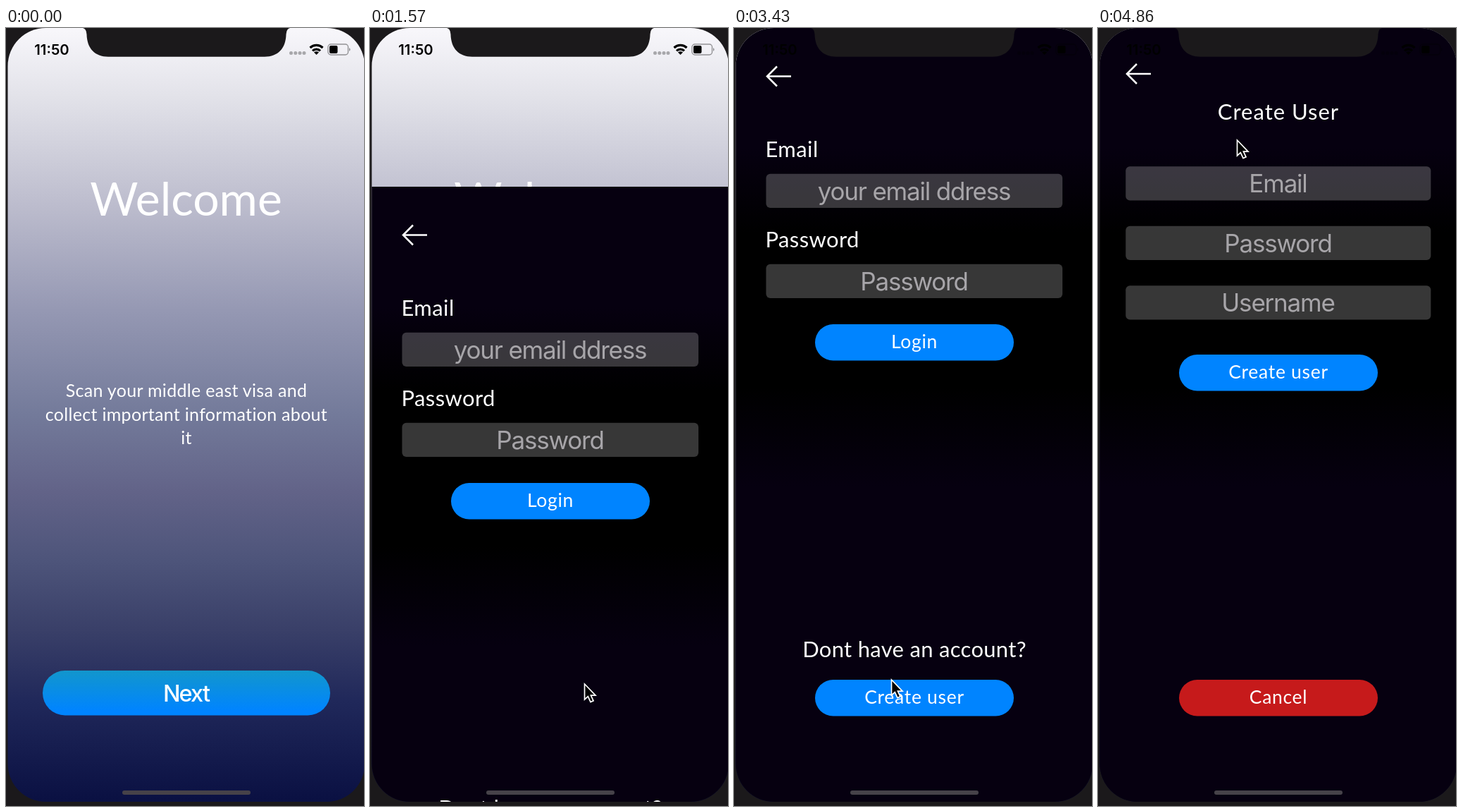
Animation of 508 by 1103 pixels, one loop 5.01 s. Source, as an HTML page:

```html
<!DOCTYPE html>
<html lang="en">
<head>
<meta charset="utf-8">
<title>Onboarding flow</title>
<style>
  html, body { margin: 0; width: 100%; height: 100%; overflow: hidden; background: #1b191b; }
  svg { display: block; width: 508px; height: 1103px; }
  text { text-anchor: middle; fill: #fff; font-family: Lato, sans-serif; font-optical-sizing: none; }
  .intro { font-size: 25px; letter-spacing: .3px; }
  .label { font-size: 31px; letter-spacing: .4px; text-anchor: start; }
  .question { font-size: 31px; letter-spacing: .3px; }
  .title { font-size: 31px; letter-spacing: 1px; }
  .button { font-size: 26.5px; letter-spacing: .7px; }
  .hint { font: 35px Inter, sans-serif; letter-spacing: -1.2px; fill: #a7a5a9; }
  .next { font: 500 32.5px Inter, sans-serif; letter-spacing: -1.9px; }
  .clock { font: 600 20.3px Inter, sans-serif; fill: #000; }
  .arrow { fill: none; stroke: #fff; stroke-width: 2.5; }
</style>
</head>
<body>
<svg viewBox="0 0 508 1103">
  <defs>
    <clipPath id="screen"><rect x="2.5" y="0" width="506.5" height="1097" rx="54"/></clipPath>
    <linearGradient id="sky" x2="0" y2="1">
      <stop offset="0" stop-color="#f8f7fb"/>
      <stop offset=".09" stop-color="#e2e2e9"/>
      <stop offset=".23" stop-color="#bcbccd"/>
      <stop offset=".365" stop-color="#9598b3"/>
      <stop offset=".5" stop-color="#737a9a"/>
      <stop offset=".6" stop-color="#626388"/>
      <stop offset=".69" stop-color="#4d547a"/>
      <stop offset=".78" stop-color="#393f68"/>
      <stop offset=".87" stop-color="#20285a"/>
      <stop offset="1" stop-color="#0a1042"/>
    </linearGradient>
    <linearGradient id="night" gradientUnits="userSpaceOnUse" x1="0" y1="0" x2="0" y2="1000">
      <stop offset=".17" stop-color="#060010"/>
      <stop offset=".29" stop-color="#000"/>
      <stop offset=".51" stop-color="#000"/>
      <stop offset=".65" stop-color="#060010"/>
    </linearGradient>
    <linearGradient id="nextFill" x2="0" y2="1">
      <stop offset="0" stop-color="#1296cc"/>
      <stop offset=".9" stop-color="#0084ff"/>
    </linearGradient>
  </defs>

  <g clip-path="url(#screen)">
    <rect width="510" height="1097" fill="url(#sky)"/>
    <text x="255.5" y="266" font-size="66">Welcome</text>
    <g class="intro">
      <text x="256" y="523">Scan your middle east visa and</text>
      <text x="256" y="556.5">collect important information about</text>
      <text x="256" y="590">it</text>
    </g>
    <rect x="52" y="911" width="408" height="63.5" rx="31.75" fill="url(#nextFill)"/>
    <text class="next" x="255.5" y="955">Next</text>
    <g id="login"></g>
    <g id="signup"></g>

    <text class="clock" x="65" y="37.5">11:50</text>
    <g opacity=".3">
      <circle cx="404.5" cy="35.5" r="2.5"/><circle cx="410.8" cy="35.5" r="2.5"/>
      <circle cx="417" cy="35.5" r="2.5"/><circle cx="423" cy="35.5" r="2.5"/>
    </g>
    <path d="M431.5 28A13.2 13.2 0 0 1 449.5 28M435 32.3A8 8 0 0 1 446 32.3" fill="none" stroke="#000" stroke-width="3.2"/>
    <path d="M440.5 38L437 34.6A5 5 0 0 1 444 34.6Z"/>
    <rect x="457" y="23" width="28.5" height="15" rx="4" fill="none" stroke="#000" stroke-opacity=".4" stroke-width="1.4"/>
    <path d="M487 28Q490 30.5 487 33Z" opacity=".45"/>
    <rect x="459" y="25" width="11.5" height="11" rx="2"/>
  </g>

  <path d="M109 0Q114 1 114.5 9C115 29 126 40.7 145 40.7H367C386 40.7 397 29 397.5 9Q398 1 403 0Z" fill="#1b191b"/>
  <rect x="165" y="1081" width="182" height="6" rx="3" fill="#464249"/>
  <path id="cursor" d="M1.5 2V24L6.3 19.6L10 27.6L14 25.9L10.4 18.1H17Z" fill="#000" stroke="#fff" stroke-width="1.7"/>
</svg>

<script>
const HEIGHT = 1097, LOOP = 5010, RATE = 7;
const BLUE = '#0084ff', RED = '#c61a1b';
const byId = id => document.getElementById(id);

const text = (style, x, y, words) => `<text class="${style}" x="${x}" y="${y}">${words}</text>`;
const sheet = () => `<rect width="510" height="1200" fill="url(#night)"/>`;
const backArrow = (x, y) =>
  `<path class="arrow" d="M${x + 14} ${y - 14}L${x} ${y}L${x + 14} ${y + 14}M${x} ${y}H${x + 34}"/>`;
const field = (x, y, hint) =>
  `<rect x="${x}" y="${y}" width="${2 * (255.8 - x)}" height="48.3" rx="6" fill="#fff" fill-opacity=".215"/>` +
  text('hint', 255.5, y + 37, hint);
const button = (y, words, color) =>
  `<rect x="115" y="${y}" width="282" height="51.5" rx="25.75" fill="${color}"/>` +
  text('button', 256, y + 34, words);

byId('login').innerHTML = sheet() + backArrow(47, 68.5) +
  text('label', 44.5, 182.5, 'Email') + field(45.5, 206.7, 'your email ddress') +
  text('label', 44.5, 310.5, 'Password') + field(45.5, 334.7, 'Password') +
  button(420, 'Login', BLUE) +
  text('question', 256, 891.5, 'Dont have an account?') + button(924, 'Create user', BLUE);

byId('signup').innerHTML = sheet() + backArrow(41, 65) +
  text('title', 256, 129.5, 'Create User') +
  field(39.3, 196.3, 'Email') + field(39.3, 280.8, 'Password') + field(39.3, 365.2, 'Username') +
  button(463, 'Create user', BLUE) + button(924, 'Cancel', RED);

// Pointer stops: step, x, y
const stops = [
  [6, 430, 990], [8, 303, 928], [13, 303, 928], [15, 306, 906], [17, 370, 300],
  [18, 380, 250], [19, 250, 241], [20, 121, 262], [21, 130, 400], [22, 165, 640],
  [23, 205, 870], [24, 222, 922], [25, 223, 948], [32, 223, 949], [33, 244, 930], [34, 196, 157]
];

function pointerAt(step) {
  const i = Math.max(1, stops.findIndex(s => s[0] >= step));
  const [from, to] = [stops[i - 1], stops[i]];
  const k = (step - from[0]) / (to[0] - from[0]);
  return [1, 2].map(axis => from[axis] + (to[axis] - from[axis]) * k);
}

// Critically damped spring from the bottom edge to the top, on whole pixels
function sheetOffset(time, start) {
  const a = Math.max(0, time - start) * 0.0185;
  return Math.round(HEIGHT * (1 + a) * Math.exp(-a));
}

function place(id, x, y) {
  byId(id).setAttribute('transform', `translate(${x} ${y})`);
}

function draw(now) {
  const step = Math.min(34, Math.floor((now % LOOP) * RATE / 1000 + 0.1));
  const time = step * 1000 / RATE;
  place('login', 0, sheetOffset(time, 1411.5));
  place('signup', 0, sheetOffset(time, 3925.5));
  byId('cursor').style.display = step < stops[0][0] ? 'none' : '';
  place('cursor', ...pointerAt(step));
}

const begin = performance.now();
function tick() {
  draw(performance.now() - begin);
  requestAnimationFrame(tick);
}
tick();
</script>
</body>
</html>
```
